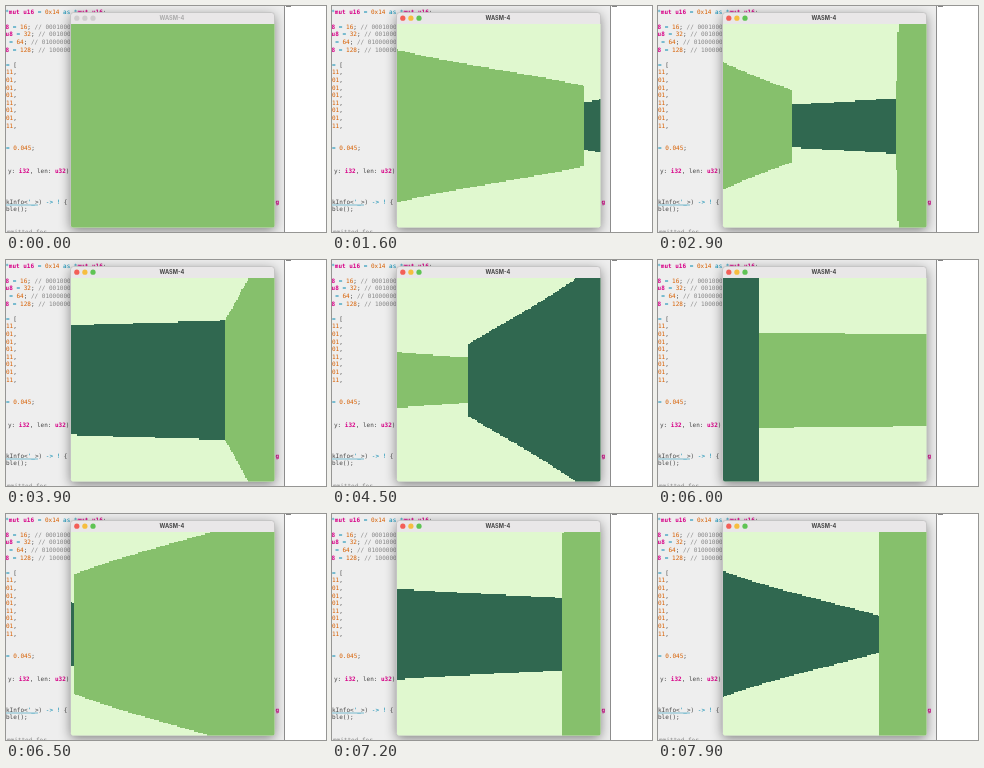
These frames come from a looping animation (320 px wide and 226 px high, 8 s). An HTML page:

```html
<!DOCTYPE html>
<html lang="en">
<head>
<meta charset="utf-8">
<title>Raycaster</title>
<style>
  html, body { margin: 0; width: 100%; height: 100%; overflow: hidden; background: #eee; }
  svg { display: block; width: 100vw; height: 100vh; }
  .code { font: 6px "DejaVu Sans Mono", monospace; fill: #444; white-space: pre; }
  .type { fill: #d70087; font-weight: bold; }
  .num { fill: #d75f00; }
  .op { fill: #0087af; }
  .note { fill: #878787; }
  .shadow { filter: drop-shadow(0 3px 6px rgba(0, 0, 0, .45)); }
  .title { font: bold 5.6px Inter, "Liberation Sans", sans-serif; text-anchor: middle; }
</style>
</head>
<body>
<svg viewBox="0 0 320 226" preserveAspectRatio="none">
  <rect width="320" height="226" fill="#eee"/>
  <g id="code" class="code"></g>
  <rect class="shadow" x="64.5" y="6.5" width="204" height="215" rx="3" fill="#e9e7e8"/>
  <rect x="64.5" y="6.5" width="204" height="215" rx="3" fill="#e9e7e8" stroke="#b4b4b4" stroke-width=".6"/>
  <g id="lights"></g>
  <text id="title" class="title" x="166" y="14.3">WASM-4</text>
  <clipPath id="screen"><path d="M65 18H268.5V219.5q0 2-2 2H67q-2 0-2-2z"/></clipPath>
  <g clip-path="url(#screen)">
    <rect x="64" y="18" width="206" height="205" fill="#e0f8cf"/>
    <g transform="translate(65 18) scale(1.272)" shape-rendering="crispEdges">
      <path id="lit" fill="#86c06c"/>
      <path id="dark" fill="#306850"/>
    </g>
  </g>
  <rect x="278" width="42" height="226" fill="#fff"/>
  <path d="M278.5 0V226" stroke="#8c8c8c"/>
  <path d="M280 .4H285" stroke="#666" stroke-width=".9"/>
</svg>
<script>
const $ = id => document.getElementById(id);
const SVG = "http://www.w3.org/2000/svg";

function add(parent, tag, attrs, text = "") {
  const el = document.createElementNS(SVG, tag);
  for (const key in attrs) el.setAttribute(key, attrs[key]);
  el.textContent = text;
  parent.append(el);
  return el;
}

// Editor lines: [row, x, "style|text", ...]
const button = (row, x, value) => [row, x, "type|u8", "op| = ", `num|${value}`, "|; ",
  `note|// ${value.toString(2).padStart(8, "0")}`];
const lines = [
  [0, -.8, "op|*", "type|mut u16", "op| = ", "num|0x14", "op| as *", "type|mut u16", "|;"],
  button(2, -4, 16), button(3, -.4, 32), button(4, -7.6, 64), button(5, -4, 128),
  [7, 0, "op|= ", "|["],
  ...["11", "01", "01", "01", "11", "01", "01", "11"].map((bits, i) => [8 + i, 0, `num|${bits}`, "|,"]),
  [18, 0, "op|= ", "num|0.045", "|;"],
  [21, 2, "|y: ", "type|i32", "|, len: ", "type|u32", "|)"],
  [25, 0, "|kInfo<", "op|'_", "|>) ", "op|-> !", "| {"],
  [25, 269.5, "type|g"],
  [26, 0, "|ble();"],
  [29, 1, "note|mmitted for"],
];
for (const [row, x, ...parts] of lines) {
  const line = add($("code"), "text", { x, y: 7.6 + row * 7.6 });
  for (const part of parts) {
    const [style, text] = part.split("|");
    add(line, "tspan", { class: style }, text);
  }
}
add($("code"), "path", { d: "M0 199H32", stroke: "#0087af", "stroke-width": .5 });

const lights = ["#f35f57", "#f6be3f", "#5fc454"].map((color, i) =>
  ({ color, el: add($("lights"), "circle", { cx: 70.8 + i * 8.1, cy: 12.2, r: 2.6 }) }));

const MAP = [
  "1111111111111111",
  "1010000101000001",
  "1010110000011101",
  "1000100101110001",
  "1110111101000101",
  "1000011001011101",
  "1011000000010001",
  "1111111111111111",
];
const COLUMNS = 160, FOV = Math.PI / 2.7, TURN = .045, WALL = 100;
const LOOP = 8000, TICK = 100;

// Player route: time, x, y, turn steps
const route = [
  [0, 1.5, 1.5, 0], [100, 1.46, 1.5, 0], [600, 1.01, 1.53, 0], [800, 1.01, 1.53, 0],
  [1100, 1.01, 1.53, -5], [1200, 1.01, 1.53, -5], [1600, 1.01, 1.53, -11],
  [1700, 1.01, 1.53, -11], [1800, 1.01, 1.53, -13], [1900, 1.01, 1.53, -13],
  [2900, 1.01, 1.53, -26], [3200, 1.12, 2, -31], [3300, 1.12, 2, -31],
  [3600, 1.2, 2.6, -33], [3700, 1.2, 2.6, -33], [3900, 1.23, 2.915, -33],
  [4200, 1.29, 3.4, -30], [4650, 1.34, 3.47, -2], [5000, 1.933, 3.386, 7],
  [5500, 2.6, 3.13, 7], [5800, 2.62, 3.12, 0], [5900, 2.62, 3.12, 0],
  [6000, 2.657, 3.12, -1], [6300, 3.3, 3.14, 0], [6800, 3.52, 3.05, 28],
  [7200, 3.63, 2.56, 30], [7450, 3.615, 2.13, 30], [7900, 3.605, 2.13, 14],
];

function playerAt(time) {
  const next = route.findIndex(stop => stop[0] > time);
  if (next < 0) return route[route.length - 1].slice(1);
  const from = route[next - 1], to = route[next];
  const part = (time - from[0]) / (to[0] - from[0]);
  return [1, 2, 3].map(i => from[i] + (to[i] - from[i]) * part);
}

// Walks the grid until a wall; also tells which kind of side was hit.
function castRay(px, py, angle) {
  const dx = Math.cos(angle), dy = -Math.sin(angle);
  const stepX = Math.sign(dx), stepY = Math.sign(dy);
  let x = Math.floor(px), y = Math.floor(py);
  let distX = (x + (dx > 0) - px) / dx, distY = (y + (dy > 0) - py) / dy;
  for (;;) {
    const upright = distX < distY;
    const distance = upright ? distX : distY;
    if (upright) { x += stepX; distX += Math.abs(1 / dx); }
    else { y += stepY; distY += Math.abs(1 / dy); }
    if (MAP[y]?.[x] !== "0") return { distance, upright };
  }
}

function drawView(px, py, heading) {
  let lit = "", dark = "";
  for (let col = 0; col < COLUMNS; col++) {
    const offset = FOV / 2 - col * FOV / COLUMNS;
    const { distance, upright } = castRay(px, py, heading + offset);
    const height = Math.min(162, Math.floor(WALL / (distance * Math.cos(offset))));
    const bar = `M${col} ${80 - Math.floor(height / 2)}h1v${height}h-1z`;
    if (upright) lit += bar; else dark += bar;
  }
  $("lit").setAttribute("d", lit);
  $("dark").setAttribute("d", dark);
}

function render(time) {
  const active = time >= TICK;
  for (const { el, color } of lights) el.setAttribute("fill", active ? color : "#cfcdce");
  $("title").setAttribute("fill", active ? "#444" : "#aaa");
  const [x, y, turns] = playerAt(time);
  drawView(x, y, Math.round(turns) * TURN);
}

const start = performance.now();
let shown = -1;
function frame() {
  const time = Math.floor((performance.now() - start) % LOOP / TICK) * TICK;
  if (time !== shown) render(shown = time);
  requestAnimationFrame(frame);
}
frame();
</script>
</body>
</html>
```
